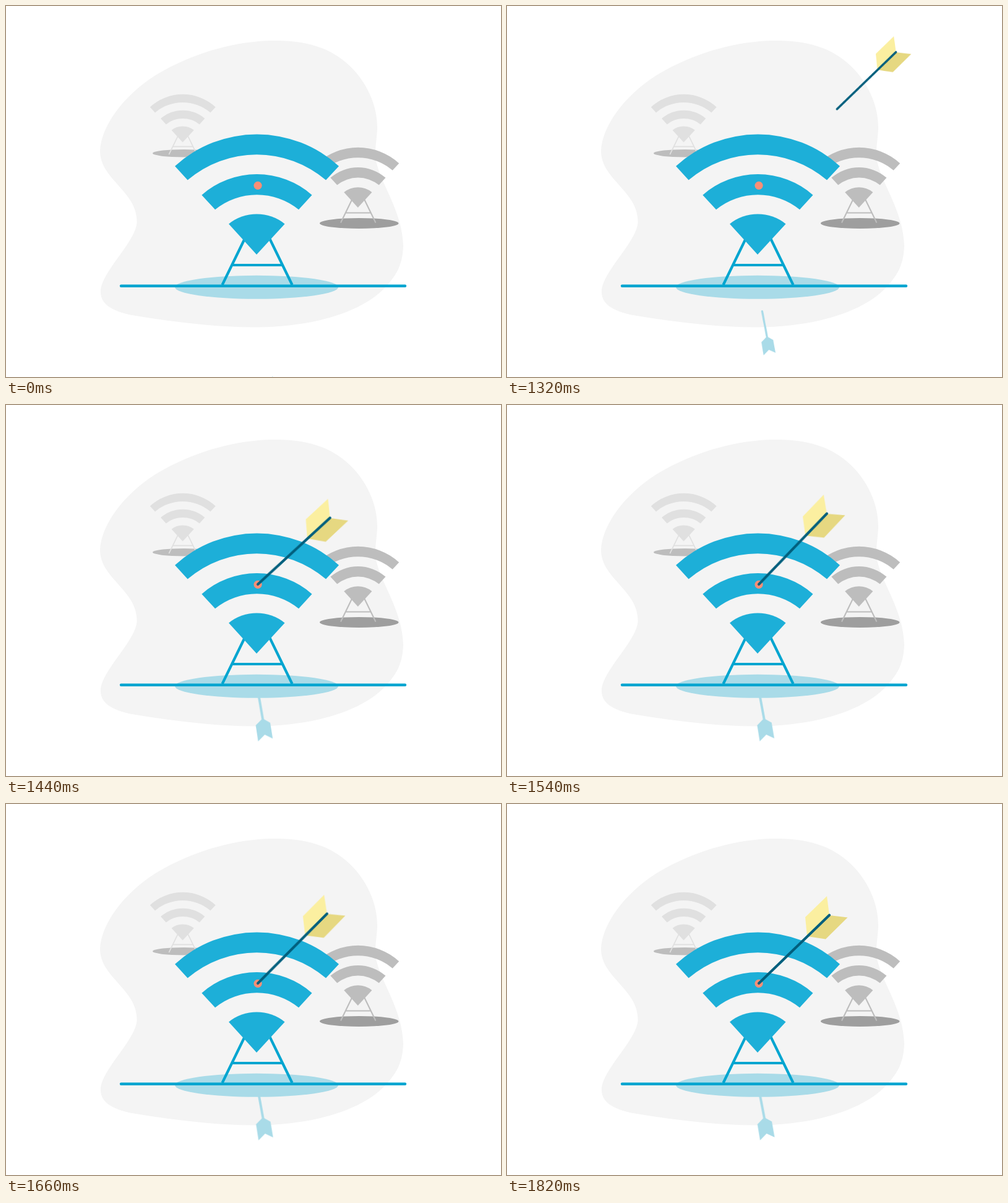
Write an HTML page without scripts that moves like this. It is 800 by 600 pixels and loops after 3600 ms.

```html
<!DOCTYPE html>
<html lang="en">
<head>
<meta charset="utf-8">
<title>Signal tower and arrow</title>
<style>
  html, body { margin: 0; width: 100%; height: 100%; overflow: hidden; background: #fff; }
  svg { display: block; width: 100vw; height: 100vh; }

  .far { fill: #e0e0e0; stroke: #e0e0e0; }
  .mid { fill: #bdbdbd; stroke: #bdbdbd; }
  .near { fill: #1dafd8; stroke: #00a5d0; }

  .fly, .glide, .sway, .drift { animation: 3600ms linear infinite; }
  .fly { animation-name: fly; }
  .glide { animation-name: glide; }
  .sway { animation-name: sway; }
  .drift { animation-name: drift; }

  /* flight lasts from 1200 to 1367 ms, then the shaft settles until 1820 ms */
  @keyframes fly {
    0%, 33.333% { transform: translate(868px, -160px) scale(.4); }
    37.963%, 100% { transform: translate(407px, 290px) scale(1); }
  }
  @keyframes glide {
    0%, 33.333% { transform: translate(430.3px, 600px) scale(.37); }
    36.667% { transform: translate(412.5px, 494.5px) scale(.815); }
    37.963%, 100% { transform: translate(406.2px, 457px) scale(1); }
  }
  @keyframes sway {
    0%, 37.963% { transform: rotate(0deg); animation-timing-function: ease-out; }
    40% { transform: rotate(1.4deg); animation-timing-function: ease-in-out; }
    42.778% { transform: rotate(-2.1deg); animation-timing-function: linear; }
    46.111% { transform: rotate(-1.15deg); animation-timing-function: linear; }
    50.556%, 100% { transform: rotate(0deg); }
  }
  @keyframes drift {
    0%, 37.963% { transform: rotate(0deg); }
    40% { transform: rotate(1deg); }
    42.778% { transform: rotate(.35deg); }
    46.111% { transform: rotate(.55deg); }
    50.556%, 100% { transform: rotate(0deg); }
  }
</style>
</head>
<body>
<svg viewBox="0 0 800 600">
  <defs>
    <g id="tower">
      <path fill="none" stroke-width="4.2" d="M386 376L349.5 451M426 376L462.5 451M366 419H446"/>
      <g stroke="none">
        <path d="M273 259A196.3 196.3 0 0 1 538 259L517 281.5A172 172 0 0 0 293.5 281.5Z"/>
        <path d="M316.3 305.7A135 135 0 0 1 494.5 305.7L473 329.2A107 107 0 0 0 338 329.2Z"/>
        <path d="M360 352.5A72 72 0 0 1 450.5 352.5L405 402Z"/>
      </g>
    </g>
  </defs>

  <path fill="#f4f4f4" d="M430 56C480 55 515 65 544 87C577 112 601 155 600 199C599 221 594 237 600 258C608 290 641 335 642 388C641 420 630 437 612 456C572 498 490 519 405 519.5C335 520 260 509 210 501C175 495 152 484 153 461C154 430 211 380 211.5 349C212 300 152 280 152 235C153 195 190 145 240 113C300 76 370 57 430 56Z"/>

  <ellipse cx="287" cy="238.2" rx="50" ry="6.3" fill="#bdbdbd"/>
  <use href="#tower" class="far" transform="translate(123.5 59.8) scale(.4)"/>

  <ellipse cx="570.7" cy="351.4" rx="63.8" ry="8.5" fill="#9e9e9e"/>
  <use href="#tower" class="mid" transform="translate(366.2 125) scale(.5)"/>

  <!-- shadow of the arrow -->
  <g class="glide">
    <g class="drift" fill="#a9dbe8">
      <path stroke="#a9dbe8" stroke-width="4" stroke-linecap="round" d="M0 0L11 58"/>
      <path d="M9.3 49.7L-1.5 61L2.8 87L13.3 76L26.3 82L21.8 56.5Z"/>
    </g>
  </g>

  <ellipse cx="405" cy="454.8" rx="132" ry="19" fill="#a9dbe8"/>
  <use href="#tower" class="near"/>
  <path stroke="#00a5d0" stroke-width="4.4" stroke-linecap="round" d="M186 452.7H645"/>
  <circle cx="407" cy="290.3" r="6.6" fill="#fa8f76"/>

  <g class="fly">
    <g class="sway">
      <path fill="#fbefa0" d="M75 -107L110 -141L114 -110L78 -76Z"/>
      <path fill="#e6d881" d="M78 -76L114 -110L143.5 -106.5L108 -71.5Z"/>
      <path stroke="#005f7d" stroke-width="4.2" stroke-linecap="round" d="M0 0L114 -110.3"/>
    </g>
  </g>
</svg>
</body>
</html>
```
